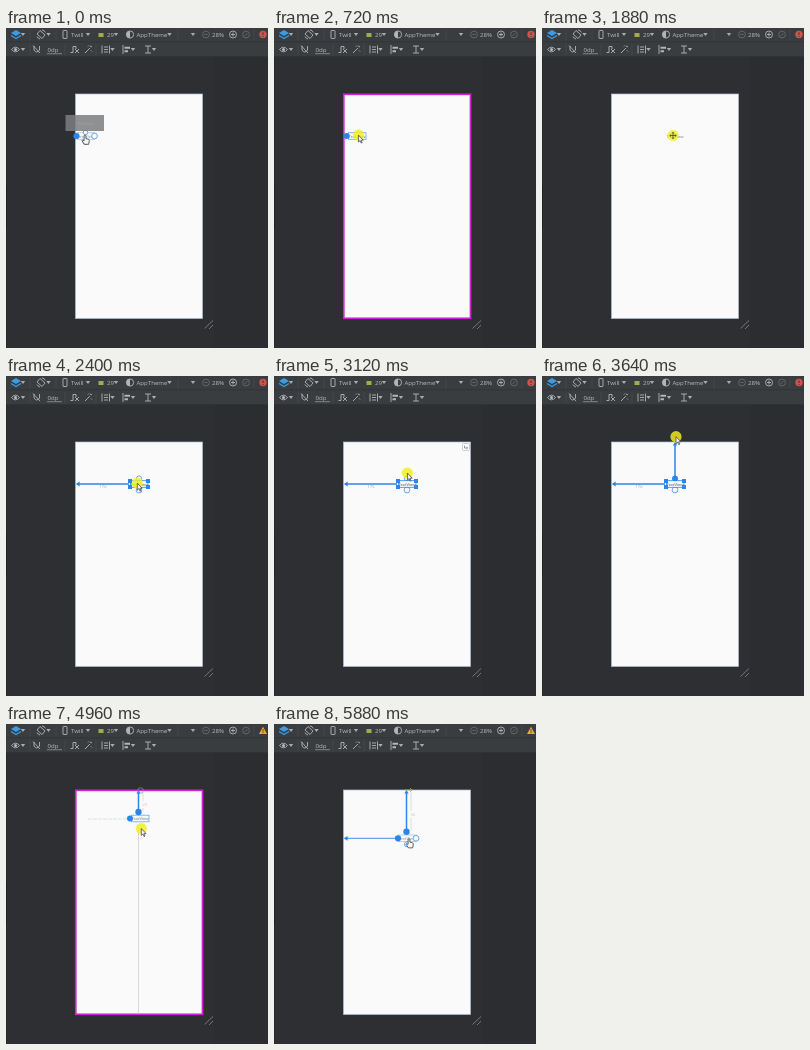
Animation of 262x320 px, one loop 5.96 s. Source, as an HTML page:

```html
<!DOCTYPE html>
<html lang="en">
<head>
<meta charset="utf-8">
<title>Layout editor</title>
<style>
  html, body { margin: 0; width: 100%; height: 100%; overflow: hidden; background: #2d2f33; }
  svg { display: block; width: 262px; height: 320px; }
  text { font-family: "Open Sans", "Noto Sans", sans-serif; font-size: 6.1px; fill: #b9bcbf; }
  .icon { fill: none; stroke: #b2b5b8; stroke-width: .9; }
  .dim { stroke: #676a6d; }
  .tiny { font-size: 4.2px; }
</style>
</head>
<body>
<svg viewBox="0 0 262 320">
  <rect width="262" height="320" fill="#2d2f33"/>
  <rect x="208" y="29" width="54" height="291" fill="#2b2d31"/>
  <path d="M.5 29V320" stroke="#27292c"/>
  <path d="M.5 158V200" stroke="#202225"/>
  <rect width="262" height="28.5" fill="#3a3d40"/>
  <path d="M0 13.8H262M0 28.8H262" stroke="#303235" stroke-width=".8"/>
  <path d="M24 2V12M50 2V12M172 2V12M248 2V12M24 16V27M59 16V27M90 16V27" stroke="#4b4e51" stroke-width=".7"/>

  <path d="M5 5L10 2L15 5L10 8Z" fill="#3d9be0"/>
  <path d="M5 7.5L10 10.5L15 7.5" fill="none" stroke="#3d9be0" stroke-width="1.4"/>
  <g class="icon">
    <path d="M31 6L34 2.5L39 7L36 10.5ZM31 8.5Q32 10.5 34 11M36 2Q38.5 2 39.3 4.5"/>
    <rect x="57" y="2.5" width="4" height="8" rx=".5"/>
    <circle cx="124" cy="6.5" r="3.6"/>
    <circle cx="227" cy="6.5" r="3.5"/>
    <path d="M225 6.5H229M227 4.5V8.5"/>
    <g class="dim">
      <circle cx="200" cy="6.5" r="3.4"/><path d="M198.3 6.5H201.7"/>
      <circle cx="240" cy="6.5" r="3.4"/><path d="M238.5 8L241.5 5"/>
    </g>
    <path d="M5.5 21.5Q9.5 16.8 13.5 21.5Q9.5 26.2 5.5 21.5Z"/>
    <path d="M28 18V22Q30.5 26 33.5 22V18M27 17.5L34 25"/>
    <path d="M41 25.7H56" stroke-width=".6"/>
    <path d="M64.5 24.5H67V18.5H70V21M69 25L73 21M69 21L73 25"/>
    <path d="M79 25L84 20M82 18.5L83 17.5M85 22.5L86 23.5M84 18L86 19"/>
    <path d="M96 17.5V25.5M103.5 17.5V25.5M98 19H102M98 21.5H102M98 24H102"/>
    <path d="M117 17V26"/>
    <path d="M118.5 19.7H124M118.5 23.3H122" stroke-width="2"/>
    <path d="M139 18H145M139 25H145M142 18V25"/>
  </g>
  <path d="M124 2.9A3.6 3.6 0 0 0 124 10.1Z" fill="#b2b5b8"/>
  <circle cx="9.5" cy="21.5" r="1.5" fill="#b9bcbf"/>
  <rect x="92.5" y="5" width="5" height="4" fill="#a3ad48"/>
  <g id="carets" fill="#a9acaf"></g>
  <text x="65" y="9">Twill</text>
  <text x="101" y="9">29</text>
  <text x="130.5" y="9">AppTheme</text>
  <text x="206" y="9">28%</text>
  <text x="41.5" y="24">0dp</text>

  <path d="M198.5 300.5L207 292.5M203 301L207 297" stroke="#85888b" stroke-width=".8"/>
  <rect x="69.5" y="66" width="127" height="224.5" fill="#fafafa"/>
  <g id="scene"></g>
</svg>
<script>
const LOOP = 5960, BLUE = '#2c86e8', PURPLE = '#cf22d3';
const scene = document.getElementById('scene');

document.getElementById('carets').innerHTML =
  [[17, 6], [42.5, 6], [82, 6], [110, 6], [163.5, 6], [187, 6], [17, 21], [106.5, 21], [127, 21], [148, 21]]
    .map(([x, y]) => `<path d="M${x - 2.2} ${y - 1}h4.4l-2.2 3z"/>`).join('');

// Rows of time, x, y
const pointer = [
  [0, 79, 107], [600, 80, 107], [1160, 111, 107.5], [1240, 114.5, 107.5],
  [1800, 134, 107.5], [1880, 131, 107.5], [2320, 131, 107.5], [2880, 133, 105],
  [3120, 133.5, 95.5], [3480, 134, 62], [3720, 134, 60], [4040, 134.5, 67.5],
  [4200, 134.5, 68], [4720, 135, 96], [4960, 135.3, 104.5], [5280, 135, 118],
  [5400, 135, 115], [5960, 135, 114.5]
];
const widget = [
  [0, 79.5, 108], [600, 79.5, 108], [1160, 97, 108], [1240, 100, 108],
  [1800, 132, 108], [1880, 133, 108], [3720, 133, 108], [3960, 133, 69],
  [4200, 133, 69], [4720, 133, 87], [4960, 133, 94.5], [5280, 133, 114.3], [5960, 133, 114.3]
];

function at(track, t) {
  let i = 0;
  while (i < track.length - 2 && t >= track[i + 1][0]) i++;
  const a = track[i], b = track[i + 1], k = (t - a[0]) / (b[0] - a[0]);
  return [a[1] + (b[1] - a[1]) * k, a[2] + (b[2] - a[2]) * k];
}

const starts = [0, 440, 600, 2160, 2320, 2920, 4800, 5400];
function stepped(t) {
  const s = starts.filter(v => v <= t).pop();
  return s + Math.floor((t - s) / 80) * 80;
}

const dot = (x, y, r = 3) => `<circle cx="${x}" cy="${y}" r="${r}" fill="${BLUE}"/>`;
const ring = (x, y, r = 2.6) =>
  `<circle cx="${x}" cy="${y}" r="${r}" fill="#fafafa" stroke="#5b9fe6" stroke-width=".9"/>`;
const line = (d, color = BLUE, w = 1) => `<path d="${d}" fill="none" stroke="${color}" stroke-width="${w}"/>`;
const label = (x, y, s, color = '#a9b4c2') =>
  `<text class="tiny" x="${x}" y="${y}" text-anchor="middle" style="fill:${color}">${s}</text>`;
const box = (x, y, color = '#6ba8e8') =>
  `<rect x="${x - 8.5}" y="${y - 3.3}" width="17.5" height="6.6" fill="#f6f9fc" stroke="${color}" stroke-width=".8"/>`;
const name = (x, y, color = '#6f7985') => label(x, y + 1.5, 'TextView', color);

const leftArrow = (x, y, w) => line(`M71 ${y}H${x}`, BLUE, w) +
  `<path d="M69.8 ${y}l3.8-2.4v4.8z" fill="${BLUE}"/>`;
const topArrow = (x, y) => line(`M${x} 68V${y}`, BLUE, 1.5) +
  `<path d="M${x} 66l2.2 3.6h-4.4z" fill="${BLUE}"/>`;

function hovered(x, y, pinnedLeft, pinnedTop) {
  return box(x, y, '#a6c8ec') + name(x, y, '#8d97a3') +
    (pinnedTop ? dot(x - .5, y - 6.5, 3.2) : ring(x, y - 3.5, 2.2)) + ring(x, y + 6, 2.6) +
    (pinnedLeft ? dot(x - 9, y, 3.1) : ring(x - 9, y)) + ring(x + 9, y, 2.9);
}

function selected(x, y) {
  const corners = [[-9, -3], [9, -3], [-9, 3], [9, 3]]
    .map(([dx, dy]) => `<rect x="${x + dx - 2}" y="${y + dy - 2}" width="4" height="4" fill="${BLUE}"/>`).join('');
  return ring(x, y - 5.5) + ring(x, y + 6, 2.9) + box(x, y, BLUE) + name(x, y, '#4c5157') + corners;
}

const cursors = {
  arrow: '<path d="M0 0v7l1.6-1.5 1.1 2.5 1-.45-1.1-2.4h2.2z" fill="#f5f5f5" stroke="#383838" stroke-width=".7"/>',
  hand: '<path d="M-.9.6q.9-1.2 1.8 0v3l2.5.6q1 .3.9 1.3l-.6 3.8h-4.2l-2.7-3.8q.3-1 2.3.3z" fill="#f8f8f8" stroke="#3b3f43" stroke-width=".8"/>',
  move: '<path d="M-3.2 0H3.2M0-3.2V3.2M-2-1L-3.2 0L-2 1M2-1L3.2 0L2 1M-1-2L0-3.2L1-2M-1 2L0 3.2L1 2" fill="none" stroke="#3f4432" stroke-width=".8"/>'
};

function draw(t) {
  const [px, py] = at(pointer, t), [x, y] = at(widget, t);
  const within = (a, b) => t >= a && t < b;
  const firstDrag = within(680, 1880), secondDrag = within(4280, 5400);
  let out = '';

  out += within(680, 1880) || within(4280, 5640)
    ? `<rect x="69.8" y="66.3" width="126.7" height="224" fill="none" stroke="${PURPLE}" stroke-width="1.7"/>`
    : `<rect x="69.5" y="66" width="127" height="224.5" fill="none" stroke="#a9bfd6" stroke-width=".7"/>`;

  if (t < 680) {
    out += hovered(x, y, true, false);
  } else if (firstDrag) {
    out += leftArrow(x - 9, y, 1.3) + label((70 + x - 9) / 2, y + 5, Math.round((x - 92) * 4.3 + 20 > 8 ? (x - 92) * 4.3 + 20 : 8)) +
      box(x + 1, y) + name(x + 1, y) + dot(x - 9.3, y);
  } else if (t < 2160) {
    out += name(x, y, '#7b8188');
  } else if (t < 2400) {
    out += hovered(x, y, false, false);
  } else if (t < 3720) {
    out += leftArrow(x - 10, y, 1.3) + label(97, y + 4.3, '176', '#91a9c4') + selected(x, y);
    if (t >= 3480) out += topArrow(x, y - 7) + dot(x, y - 5.5, 2.8);
    if (within(3040, 3560)) {
      out += '<rect x="188.5" y="67.5" width="7" height="7" rx="1.2" fill="#fff" stroke="#b4bac0" stroke-width=".7"/>' +
        line('M190.5 69.5V72H193.5M192.5 71L193.7 72L192.5 73', '#65707b', .7);
    }
  } else if (t < 4280) {
    out += leftArrow(x - 11, y, .8) + hovered(x, y, true, false);
  } else {
    const top = y - 6.5;
    if (secondDrag || t < 5640) {
      out += `<path d="M132.5 ${y + 6}V290" stroke="#c9cbcf" stroke-width=".7"/>` +
        `<path d="M82 ${y + .5}H${x - 11}" stroke="#d8dadd" stroke-width=".8" stroke-dasharray="4 1"/>`;
    } else {
      out += leftArrow(x - 11, y, .9);
    }
    if (top > 70) out += topArrow(132.5, top - 1);
    if (top > 78) {
      const mid = (68 + top) / 2 + 3;
      out += line(`M137 68V${mid - 4}M137 ${mid + 3}V${top - 1}`, '#d3d6da', .8) +
        label(139, mid + 1, Math.round((y - 69) * .8), '#c0c5cb');
    }
    if (secondDrag) {
      out += box(x + 1, y) + name(x + 1, y) + dot(132.5, top, 3.2) + dot(x - 9, y) +
        '<circle cx="134.5" cy="66.5" r="2.8" fill="none" stroke="#8f949b" stroke-width=".7"/>';
    } else {
      out += hovered(x, y, true, true) +
        line('M130.5 66H138.5M136 64.2L138 66L136 67.8', '#a4ad50', .8);
    }
  }

  if (t < 80) {
    out += '<rect x="59.5" y="87" width="38.5" height="16" fill="#7c7e80" opacity=".85"/>' +
      label(80, 97, 'TextView', '#a3a5a7');
  }

  const halo = within(440, 3720) || secondDrag;
  const kind = within(1880, 2400) ? 'move'
    : t < 600 || within(3800, 4280) || t >= 5400 ? 'hand' : 'arrow';
  if (halo) out += `<circle cx="${px}" cy="${py}" r="5.6" fill="#f4ee20" opacity=".82"/>`;
  out += `<g transform="translate(${px} ${py})">${cursors[kind]}</g>`;

  out += t < 4280
    ? '<circle cx="257" cy="6.5" r="3.7" fill="#d0524d"/><path d="M257 4.3V7M257 8V9" stroke="#3a3d40"/>'
    : '<path d="M257 2.8L261 10H253Z" fill="#efa832"/><path d="M257 5V7.6M257 8.2V9.2" stroke="#3a3d40" stroke-width=".9"/>';
  scene.innerHTML = out;
}

const begin = performance.now();
let last = -1;
function tick() {
  const t = stepped((performance.now() - begin) % LOOP);
  if (t !== last) draw(last = t);
  requestAnimationFrame(tick);
}
tick();
</script>
</body>
</html>
```
